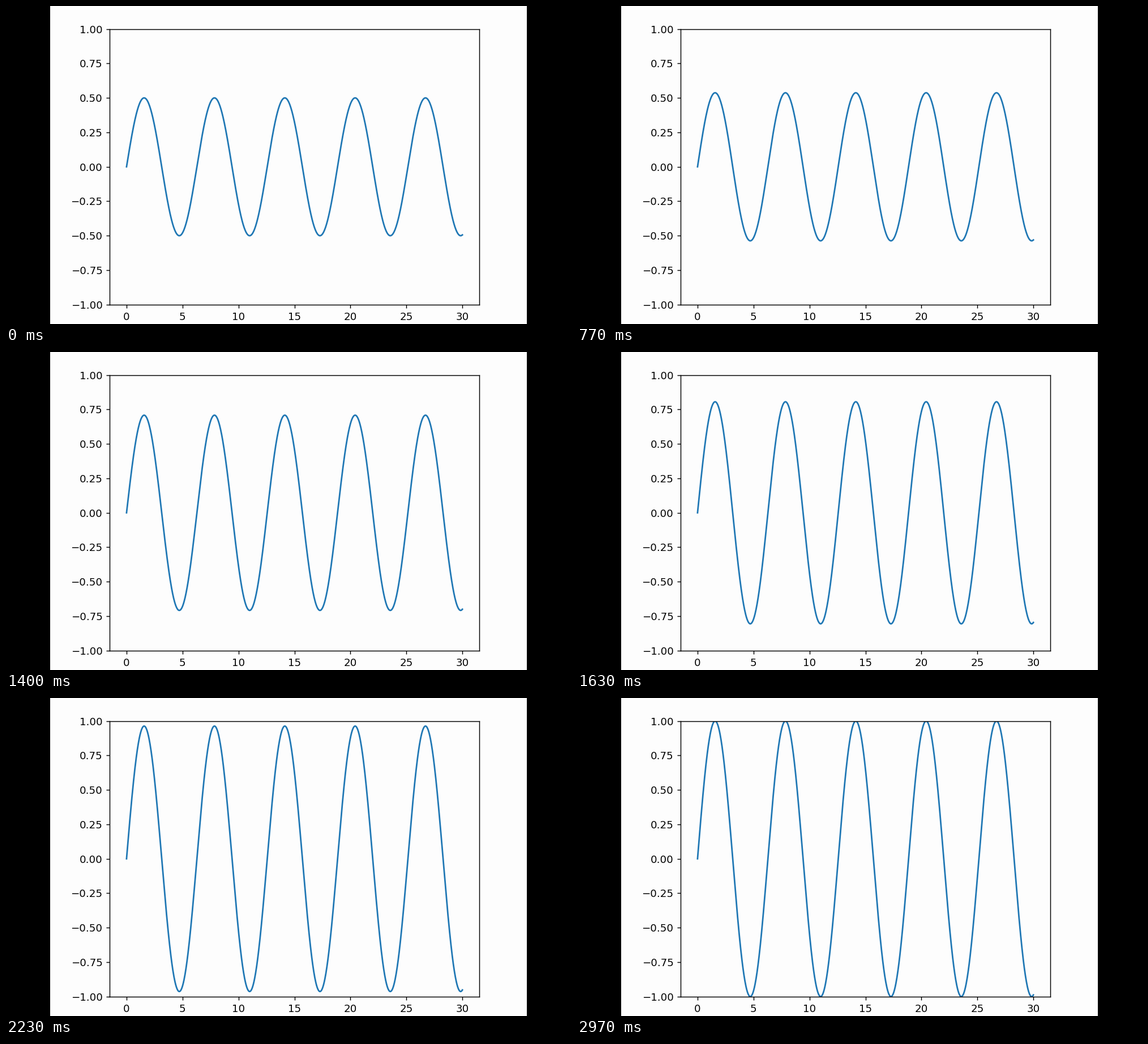
Recreate the animation shown at these times as a matplotlib script. Size 998 px wide and 561 px high, loop 3.01 s.

```python
import numpy as np
import matplotlib.pyplot as plt
from matplotlib.animation import FuncAnimation
from matplotlib.patches import Rectangle

W, H, DPI = 998, 561, 128
LOOP, TICK = 3010, 10          # ms
STEPS = 90                     # distinct poses per loop, 30 per second

# The chart is a 640x480 page, enlarged and centred on the stage.
ZOOM = 842 / 640
PAGE_W, PAGE_H = 640 * ZOOM, 480 * ZOOM
PAGE_X, PAGE_Y = (W - PAGE_W) / 2, (H - PAGE_H) / 2
PT = 100 * ZOOM / DPI          # page points to stage points
PAPER = "#fdfdfd"

plt.rcParams.update({
    "font.family": "DejaVu Sans",
    "font.size": 10 * PT,
    "axes.linewidth": 0.8 * PT,
    "lines.linewidth": 1.5 * PT,
})
for axis in ("xtick", "ytick"):
    plt.rcParams.update({
        f"{axis}.major.size": 3.5 * PT,
        f"{axis}.major.width": 0.8 * PT,
        f"{axis}.major.pad": 3.5 * PT,
        f"{axis}.labelsize": 10 * PT,
    })


def sigmoid(x):
    return 1 / (1 + np.exp(-x))


def smooth(u, steep=10):
    """Logistic ease that starts at exactly 0 and ends at exactly 1."""
    low = sigmoid(-steep / 2)
    return (sigmoid(steep * (u - 0.5)) - low) / (1 - 2 * low)


fig = plt.figure(figsize=(W / DPI, H / DPI), dpi=DPI, facecolor="black")
fig.add_artist(Rectangle((PAGE_X / W, 0), PAGE_W / W, 1, color=PAPER, lw=0, zorder=-1))

ax = fig.add_axes([
    (PAGE_X + 0.125 * PAGE_W) / W,
    (PAGE_Y + 0.11 * PAGE_H) / H,
    0.775 * PAGE_W / W,
    0.77 * PAGE_H / H,
], facecolor=PAPER)
ax.set(xlim=(-1.5, 31.5), ylim=(-1, 1),
       xticks=np.arange(0, 31, 5), yticks=np.linspace(-1, 1, 9))

x = np.linspace(0, 30, 1000)
wave = np.sin(x)
line, = ax.plot(x, 0.5 * wave, color="#1f77b4")


def draw(i):
    step = min(int((i * TICK + TICK / 2) * 30 / 1000), STEPS - 1)
    line.set_ydata((0.5 + 0.5 * smooth(step / STEPS)) * wave)
    return line,


anim = FuncAnimation(fig, draw, frames=LOOP // TICK, interval=TICK,
                     repeat=True, repeat_delay=0, blit=False)
plt.show()
```
